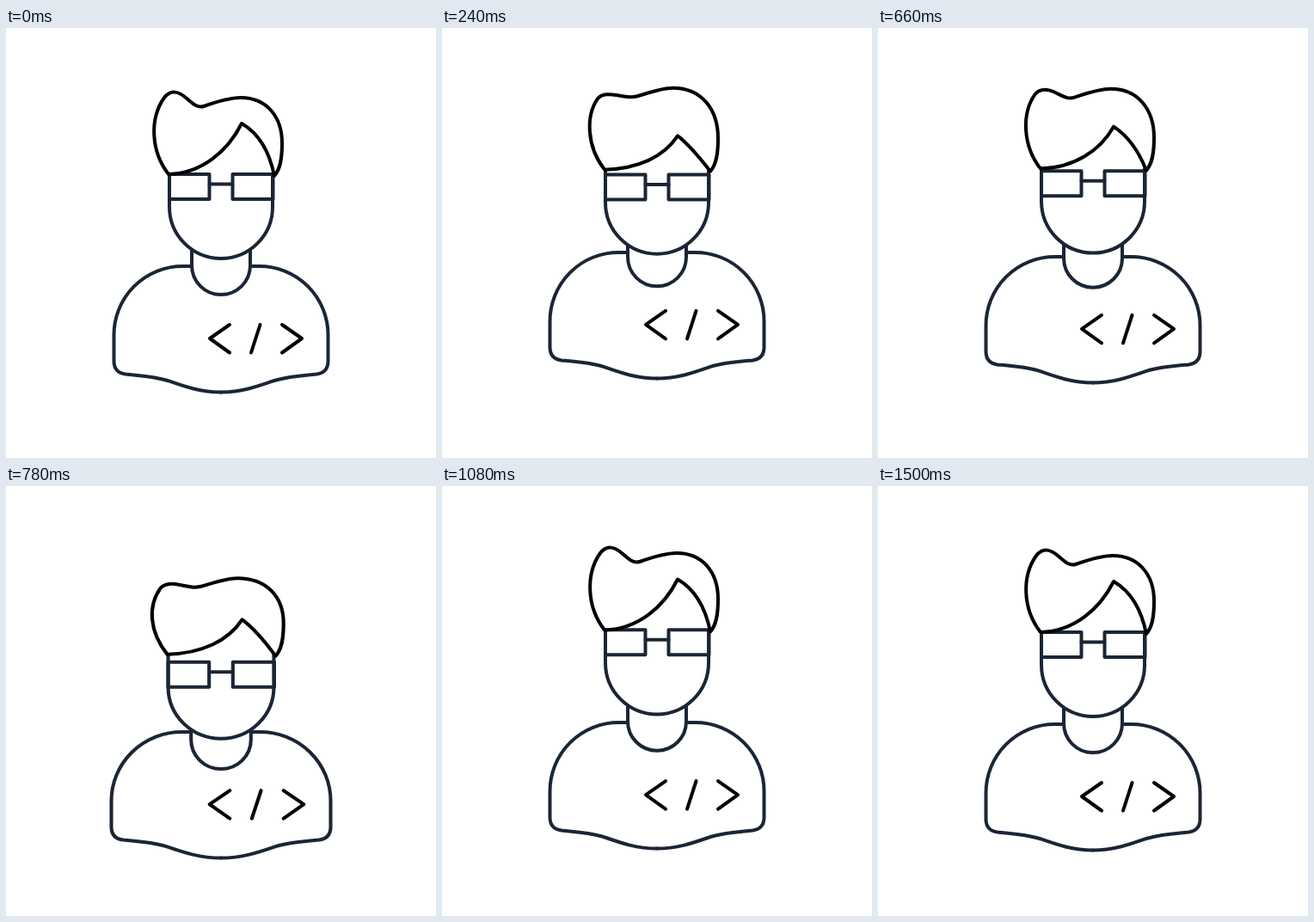
Recreate the animation shown at these times as an HTML page. Size 500 by 500 pixels, loop 5030 ms.

```html
<!DOCTYPE html>
<html lang="en">
<head>
<meta charset="utf-8">
<title>Jumping developer</title>
<style>
  html, body { margin: 0; width: 100%; height: 100%; overflow: hidden; background: #fff; }
  svg { display: block; width: 100vw; height: 100vh; }
  path, rect { fill: none; stroke: #1b2535; stroke-width: 4; stroke-linecap: round; stroke-linejoin: round; }
  .black { stroke: #000; }
  #face { fill: #fff; }
</style>
</head>
<body>
<svg viewBox="0 0 500 500">
  <g id="figure">
    <path id="neck" d="M216 245V276A34 34 0 0 0 284 276V245"/>
    <path id="side" d="M216 277H205.5A80 80 0 0 0 125.5 357V388Q126 401 139 402.5C156 404 172 405 188 410C208 417 226 423.5 250 423.5"/>
    <use href="#side" transform="matrix(-1 0 0 1 500 0)"/>
    <path class="black" d="M260 345L237 361L260 377.5M295.5 345L285 377.5M321 345L344 361L321 377.5"/>
    <g id="head">
      <path id="face" d="M190 170V208A60 60 0 0 0 310 208V170"/>
      <g id="glasses">
        <rect x="190" y="170" width="46.5" height="29"/>
        <rect x="263.5" y="170" width="47" height="29"/>
        <path d="M236.5 181.5H263.5"/>
      </g>
      <path id="hair" class="black"/>
    </g>
  </g>
</svg>
<script>
  const LOOP = 5030, STEP = 30, END = 1500;
  const [figure, neck, head, glasses, hair] =
    ['figure', 'neck', 'head', 'glasses', 'hair'].map(id => document.getElementById(id));

  // Sine easing between [time, value] poses.
  const ease = poses => t => {
    const i = poses.findIndex(p => p[0] > t);
    if (i < 0) return poses[poses.length - 1][1];
    const [t0, a] = poses[i - 1], [t1, b] = poses[i];
    return a + (b - a) * (1 - Math.cos(Math.PI * (t - t0) / (t1 - t0))) / 2;
  };

  // Crouch, jump, hang, land, rebound, settle.
  const jump = ease([[0, 0], [50, 11], [420, -41], [460, -41], [825, 11], [990, -4.5], [1200, 2], [END, 0]]);
  const squash = ease([[0, 0], [200, 1], [460, 0], [870, 1], [1080, 0]]);

  // The quiff flattens by k while its top floats by lift.
  function hairPath(k, lift) {
    const p = (x, y, dy, dx = 0) => `${x + dx * k} ${y + dy * k + lift} `;
    return 'M189 170C168 143 ' + p(167, 105, 7) + p(184, 81, 11, -3)
      + 'C' + p(192, 71, 15, -6) + p(201, 74, 13, -6) + p(209, 81, 7, -5)
      + 'S' + p(223, 93.5, -2.5, -5) + p(230, 91, -2.5, -3)
      + 'S' + p(258, 81, -2, -3) + p(273, 81, -2, -5)
      + 'C' + p(302, 81, -2) + `321 ${102 + lift / 2} 321 134`
      + 'C321 152 319 164 312 172'
      + `C${306 - 6 * k} ${142 + 16 * k} ${293 - 6 * k} ${122 + 20 * k} 274 ${111 + 21 * k}`
      + `C258 ${143 + 13 * k} 228 169 189 170Z`;
  }

  const shift = (node, y) => node.setAttribute('transform', `translate(0 ${y})`);

  function draw(now) {
    const t = Math.min(END, Math.floor(now % LOOP / STEP) * STEP);
    const y = jump(t), k = squash(t);
    const nod = 16 * k + 0.27 * y;
    const wide = 1 + 0.009 * k * Math.sqrt(Math.max(0, y));
    figure.setAttribute('transform', `translate(${250 * (1 - wide)} ${y}) scale(${wide} 1)`);
    shift(head, nod);
    shift(neck, nod * 0.6);
    shift(glasses, nod * 0.55);
    hair.setAttribute('d', hairPath(k, 0.25 * y));
  }

  const start = performance.now();
  function tick() {
    draw(performance.now() - start);
    requestAnimationFrame(tick);
  }
  tick();
</script>
</body>
</html>
```
